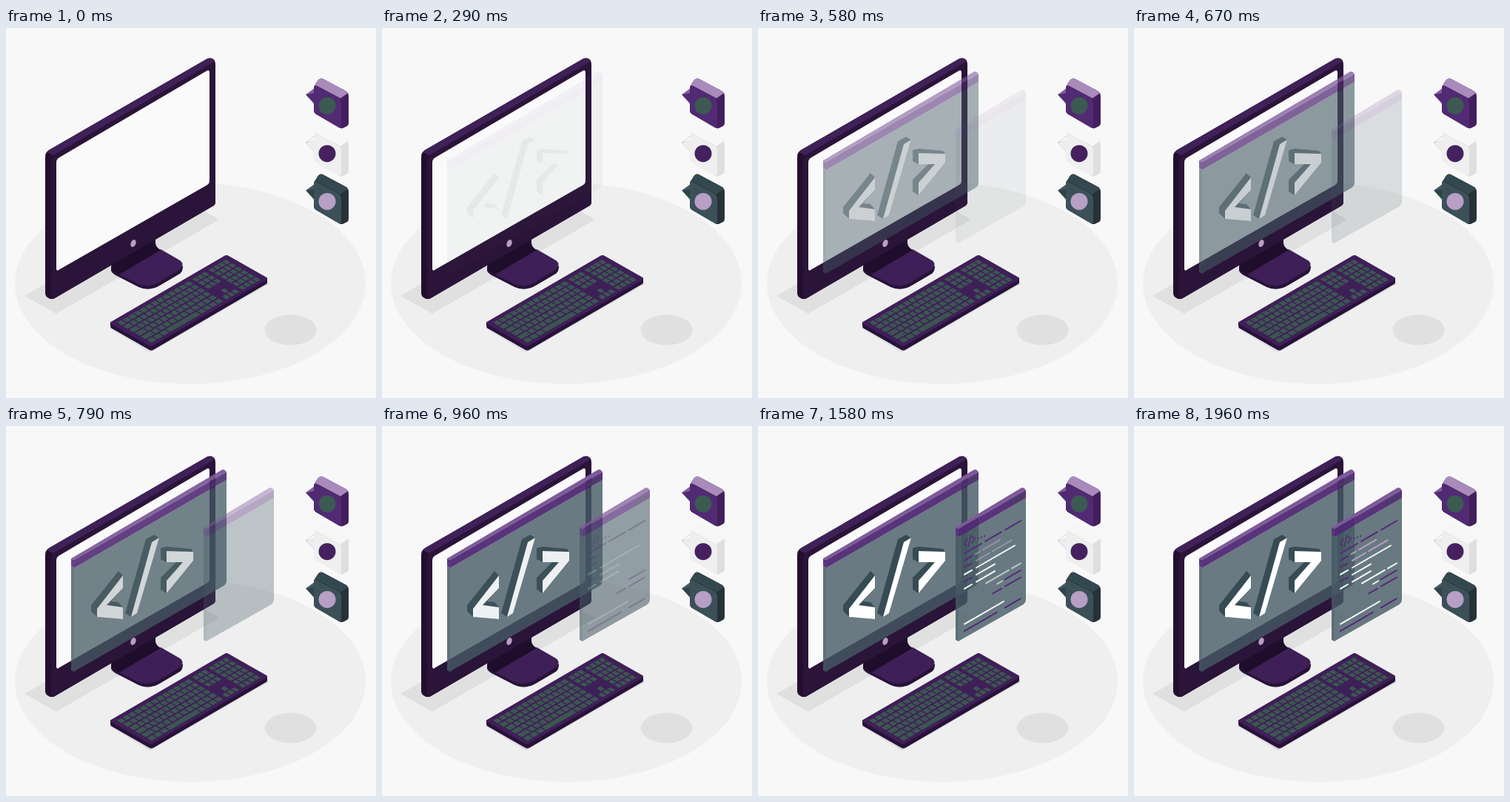
An HTML page for the animation above (2.04 s loop, 500 px wide and 500 px high).

```html
<!DOCTYPE html>
<html lang="en">
<head>
<meta charset="utf-8">
<title>Isometric coding desk</title>
<style>
  html, body { margin: 0; width: 100%; height: 100%; overflow: hidden; background: #f8f8f8; }
  svg { display: block; width: 100%; height: 100%; }
</style>
</head>
<body>
<svg id="stage" viewBox="0 0 500 500"></svg>
<script>
const LOOP = 2040;
const SLOPE = 0.5774; // isometric edge, 30 degrees
const stage = document.getElementById('stage');

const path = (d, fill, extra = '') => `<path d="${d}" fill="${fill}" ${extra}/>`;
const poly = (points, fill, extra = '') => `<polygon points="${points}" fill="${fill}" ${extra}/>`;
const ellipse = (x, y, rx, ry, fill, extra = '') =>
  `<ellipse cx="${x}" cy="${y}" rx="${rx}" ry="${ry}" fill="${fill}" ${extra}/>`;
const group = (id, content) => `<g id="${id}">${content}</g>`;

function floor() {
  return ellipse(249, 345, 237, 136, '#efefef') +
    poly('25,362 68,386 288,259 245,234', '#e0e0e0') +
    ellipse(384.5, 408, 35, 20.5, '#e0e0e0');
}

function monitor() {
  return path('M142 322V328Q143 331 148 334L179 350Q192 356 206 349L235 332Q239 329 239 322L209 300Z', '#28123a') +
    path('M153 333L209 299L235 314Q242 319 235 326L206 344Q192 351 179 346Z', '#3e1f57') +
    path('M142 320L202 285V291Q203 297 209 300L153 333L144 328Z', '#1f0d2c') +
    path('M53 174Q53 168 58 165L271 42Q276 39 280 42Q283 44 283 50V235Q283 239 279 241L66 365Q61 368 56 364Q53 362 53 358Z', '#220f30') +
    path('M55 168L58 165L271 42Q276 39 282 44L278 48L64 172Z', '#3f2158') +
    path('M61 178Q61 174 65 172L277 48Q283 45 283 52V235Q283 239 279 241L66 365Q61 368 61 362Z', '#2b1439') +
    path('M68 182Q68 177 72 175L271 58Q275 56 275 60V207Q275 210 272 212L71 327Q68 329 68 325Z', '#fafafa') +
    ellipse(172, 291, 3.4, 5.2, '#b99fc4', 'transform="rotate(22 172 291)"');
}

// Keys are laid out on a unit square: s along the long side, t across it.
function keyboard() {
  const at = (s, t) => `${(141 + 157 * s + 55 * t).toFixed(1)} ${(399 - 91 * s + 32 * t).toFixed(1)}`;
  let keys = '';
  const key = (s, row, width) => {
    const t = 0.07 + row * 0.147, a = s + 0.004, b = s + width - 0.005, c = t + 0.112;
    keys += `M${at(a, t)}L${at(b, t)}L${at(b, c)}L${at(a, c)}Z`;
  };
  const run = (start, end, row, count) => {
    const width = (end - start) / count;
    for (let i = 0; i < count; i++) key(start + i * width, row, width);
  };
  [13, 14, 14, 13, 12].forEach((count, row) => {
    const first = 0.045 + row * 0.01;
    key(0.03, row, first);
    run(0.03 + first, 0.655, row, count - 1);
  });
  run(0.03, 0.19, 5, 3);
  key(0.19, 5, 0.27);
  run(0.46, 0.655, 5, 4);
  for (let row = 0; row < 3; row++) run(0.675, 0.795, row, 3);
  key(0.715, 4, 0.04);
  run(0.675, 0.795, 5, 3);
  for (let row = 0; row < 6; row++) run(0.815, 0.975, row, 4);

  return poly('139,405 194,439 355,346 353,341', '#e0e0e0') +
    path('M141 398L298 308L353 338V344Q353 346 350 347L199 435Q196 437 192 434L143 406Q141 405 141 402Z', '#28123a') +
    path('M142 397L295 308Q298 306 301 308L352 337Q354 339 351 341L199 429Q196 431 193 429L142 400Q140 398 142 397Z', '#3f1f58') +
    path(keys, '#3b5650');
}

function bubble(y, [front, top, side, tail, fold], mark, outline = 'none') {
  return `<g transform="translate(0 ${y})">` +
    poly('405,22 416,14 418,22', fold, `stroke="${outline}" stroke-width=".6"`) +
    poly('405,22 417,20 417,35', tail, `stroke="${outline}" stroke-width=".6"`) +
    path('M416 13Q416 10 418 8L422 2Q425 -1 429 1L459 17Q463 19 463 24V60Q463 64 460 65L456 67Q454 68 451 67L420 49Q416 47 416 43Z', side) +
    path('M417 10L422 2Q425 -1 429 1L459 17Q461 18 462 20L452 27L420 10Z', top) +
    path('M416 14Q416 9 420 11L449 26Q453 28 453 33V63Q453 69 449 66L420 49Q416 47 416 43Z', front) +
    ellipse(434, 37, 11.5, 11.5, mark) + '</g>';
}

// A floating window: top-left corner of its front face, its width and height.
function pane(x, y, width, height) {
  const right = x + width, rise = width * SLOPE, top = y - rise;
  const body = `M${x} ${y + 11}L${right} ${top + 11}V${top + height - 4}` +
    `Q${right} ${top + height} ${right - 4} ${top + height + 3}L${x + 3} ${y + height - 2}L${x} ${y + height}Z`;
  const dots = [7, 13, 19].map(d =>
    ellipse(right - d, top + 5.5 + d * SLOPE, 1.7, 2.3, '#37474f', `transform="rotate(20 ${right - d} ${top + 5.5 + d * SLOPE})"`)).join('');
  return path(body, '#455a64', 'fill-opacity=".8"') +
    poly(`${x - 4},${y + 8} ${x},${y + 11} ${x},${y + height} ${x - 4},${y + height - 2}`, '#455a64', 'fill-opacity=".86"') +
    poly(`${x - 4},${y - 2} ${x},${y} ${x},${y + 11} ${x - 4},${y + 8}`, '#5c3780') +
    path(`M${x - 4} ${y - 2}L${right - 6} ${top - 3}Q${right - 3} ${top - 4} ${right} ${top}L${x} ${y}Z`, '#7e5a9a') +
    poly(`${x},${y} ${right},${top} ${right},${top + 11} ${x},${y + 11}`, '#502a73', 'fill-opacity=".95"') + dots;
}

function codeSign() {
  const dark = '#364b53', light = '#ffffff';
  return poly('115,242 152,196 158,202 158,219 142,237 152,238 158,245 158,261 123,258 115,250', dark) +
    poly('158,202 158,219 136,242 158,245 158,261 123,258 123,247', light) +
    poly('161,253 189,153 200,147 207,151 177,253 169,258', dark) +
    poly('197,157 207,151 177,253 169,258', light) +
    poly('209,165 217,163 250,166 253,170 253,182 217,226 209,221 209,205 231,183 217,184 209,180', dark) +
    poly('217,169 253,170 253,182 217,226 217,209 239,184 217,184', light);
}

// Lines of code: [row, x from, x to, ...more pairs]
function codeLines(color, rows) {
  let d = '';
  for (const [row, ...ends] of rows) {
    const y = x => (179 + row * 9.55 - (x - 267) * SLOPE).toFixed(1);
    for (let i = 0; i < ends.length; i += 2) {
      const [a, b] = [ends[i], ends[i + 1]];
      d += `M${a} ${y(a)}L${b} ${y(b)}`;
    }
  }
  return path(d, 'none', `stroke="${color}" stroke-width="2" stroke-linecap="round"`);
}

const PURPLE = '#532b77', LILAC = '#b79fc6', WHITE = '#fafafa';

const smallSign = path('M283 152L279 160L283 161M288 147L284 164M289 150L293 151L289 159', 'none',
  `stroke="${PURPLE}" stroke-width="1.4"`) +
  [298, 302, 306].map(x => ellipse(x, 152 - (x - 298) * 0.4, 1, 1.2, PURPLE)).join('');

stage.innerHTML = floor() + monitor() + keyboard() +
  bubble(68, ['#512a73', '#a98bbb', '#41205c', '#512a73', '#7e5a9a'], '#3c5a52') +
  bubble(132.7, ['#efefef', '#f7f7f7', '#dfdfdf', '#eeeeee', '#fafafa'], '#45225f', '#c4c4c8') +
  bubble(197.4, ['#3c5058', '#344850', '#263238', '#2f434a', '#455a64'], LILAC) +
  group('window', pane(92, 181, 206, 151)) +
  group('sign', codeSign()) +
  group('editor', pane(271, 139, 91, 152)) +
  group('purple', smallSign + codeLines(PURPLE, [
    [0, 279, 302, 307, 329, 334, 355], [1, 279, 289], [2, 279, 289], [4, 279, 289],
    [7, 334, 355], [8, 317, 329, 334, 355], [11, 279, 323, 334, 355]])) +
  group('white', codeLines(WHITE, [
    [3, 279, 289, 295, 347], [4, 295, 320], [5, 279, 289, 295, 320], [10, 279, 332]])) +
  group('late', codeLines(LILAC, [[1, 294, 300, 304, 327], [2, 295, 313, 317, 343]]) +
    codeLines(WHITE, [[6, 308, 339, 343, 355], [7, 323, 330]]));

const linear = p => p;
const smooth = p => p * p * (3 - 2 * p);
const fades = [
  ['window', 190, 900, smooth],
  ['sign', 250, 1050, linear],
  ['editor', 430, 1250, smooth],
  ['purple', 800, 1330, linear],
  ['white', 800, 1560, linear],
  ['late', 1120, 1880, linear],
].map(([id, start, end, ease]) => ({ node: document.getElementById(id), start, end, ease }));

function draw() {
  const time = performance.now() % LOOP;
  for (const { node, start, end, ease } of fades) {
    const progress = Math.min(1, Math.max(0, (time - start) / (end - start)));
    node.setAttribute('opacity', time < 290 ? 0 : ease(progress));
  }
  requestAnimationFrame(draw);
}
draw();
</script>
</body>
</html>
```
